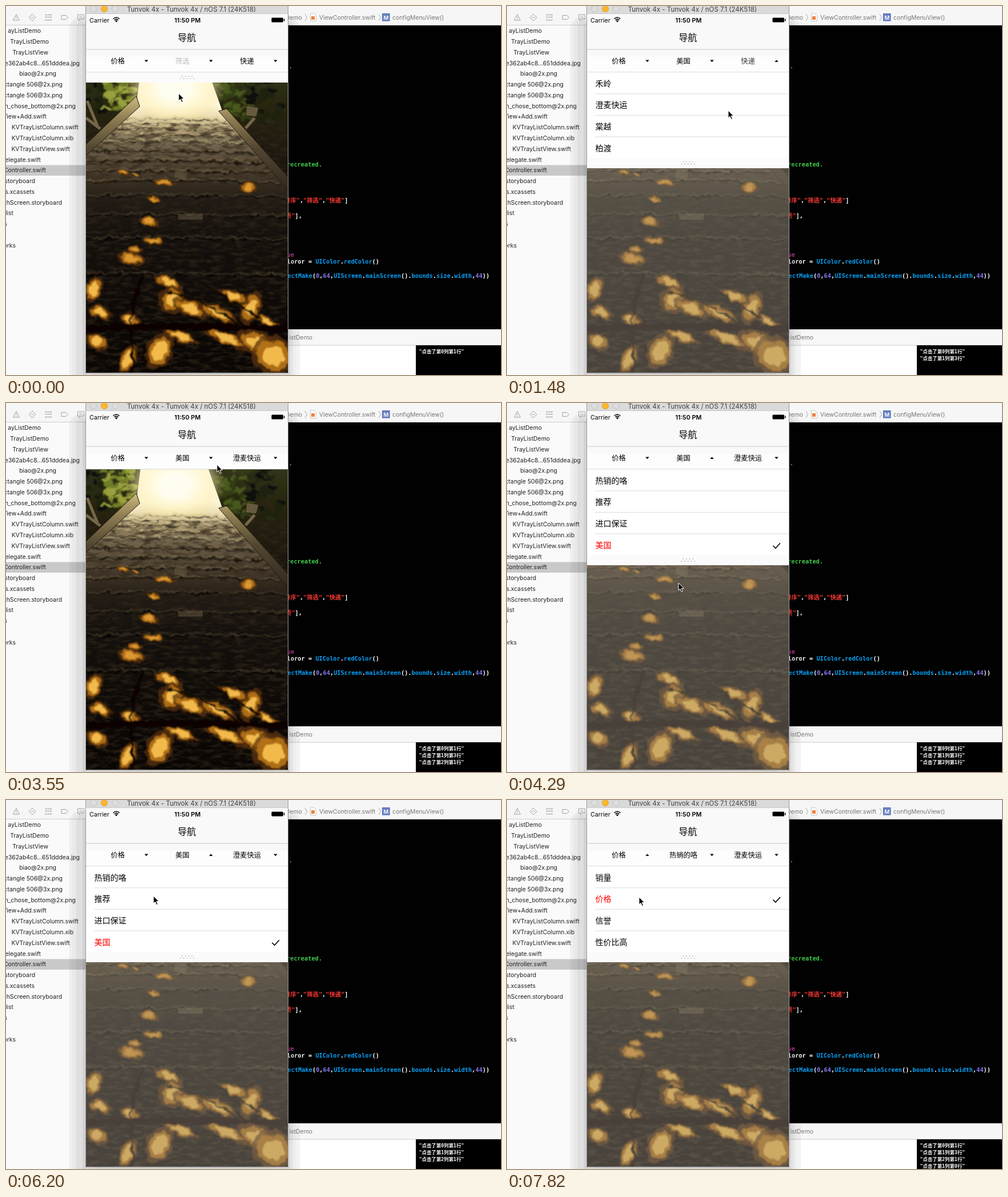
Animation of 866x646 px, one loop 8 s. Source, as an HTML page:

```html
<!DOCTYPE html>
<html lang="zh">
<head>
<meta charset="utf-8">
<style>
html, body { margin: 0; width: 100%; height: 100%; overflow: hidden; background: #fff; }
svg { display: block; width: 866px; height: 646px; }
text { white-space: pre; }
.ui { font-family: Inter, "Noto Sans CJK SC", "Noto Sans CJK", sans-serif; }
.cjk { font-family: "Noto Sans CJK SC", "Noto Sans CJK", sans-serif; }
.code { font: bold 10.3px "DejaVu Sans Mono", "Noto Sans CJK SC", "Noto Sans CJK", monospace; fill: #fff; }
.code .r { fill: #fb3a35; } .code .b { fill: #0aa0f5; } .code .n { fill: #8378f2; }
.code .g { fill: #41cf4b; } .code .m { fill: #b9359a; }
.log { font-size: 8.4px; }
</style>
</head>
<body>
<svg id="stage" viewBox="0 0 866 646" xmlns="http://www.w3.org/2000/svg"></svg>
<script>
const LOOP = 8000, TICK = 147.5, OPEN_H = 150, TOP = 116;
const stage = document.getElementById('stage');

const rect = (x, y, w, h, fill, more = '') =>
  `<rect x="${x}" y="${y}" width="${w}" height="${h}" fill="${fill}" ${more}/>`;
const path = (d, stroke, width = 1, fill = 'none', more = '') =>
  `<path d="${d}" stroke="${stroke}" stroke-width="${width}" fill="${fill}" ${more}/>`;
const text = (x, y, s, size, more = '', cls = 'ui') =>
  `<text x="${x}" y="${y}" class="${cls}" ${size ? `font-size="${size}"` : ''} ${more}>${s}</text>`;
const gradient = (id, stops) =>
  `<linearGradient id="${id}" gradientUnits="userSpaceOnUse" x1="0" y1="116" x2="0" y2="642">` +
  stops.map(([y, c]) => `<stop offset="${(y - 116) / 526}" stop-color="${c}"/>`).join('') +
  '</linearGradient>';
const END = 'text-anchor="end"', MID = 'text-anchor="middle"';

function random(seed) {
  return () => (seed = (seed * 16807) % 2147483647) / 2147483647;
}

function defs() {
  return `<defs>
    ${gradient('ground', [[116, '#33351a'], [170, '#28260f'], [230, '#211c10'], [320, '#15110c'], [420, '#0c0907'], [642, '#080504']])}
    ${gradient('stone', [[116, '#fffef4'], [172, '#fff9df'], [196, '#e9d9ac'], [216, '#a8966f'], [238, '#786a51'], [270, '#584b39'], [305, '#3d3326'], [340, '#211b15'], [400, '#14100d'], [467, '#110d0a'], [560, '#0c0806'], [642, '#0a0604']])}
    ${gradient('wall', [[150, '#d9c688'], [200, '#8b7a50'], [250, '#514530'], [320, '#332b20']])}
    <radialGradient id="sun"><stop offset=".3" stop-color="#fffdf0"/><stop offset=".65" stop-color="#fff4c4" stop-opacity=".7"/><stop offset="1" stop-color="#f5dd8d" stop-opacity="0"/></radialGradient>
    <filter id="ragged" x="-5%" y="-5%" width="110%" height="110%">
      <feTurbulence type="fractalNoise" baseFrequency=".07" numOctaves="3" seed="4"/>
      <feDisplacementMap in="SourceGraphic" scale="13" xChannelSelector="R" yChannelSelector="G" result="d"/>
      <feGaussianBlur in="d" stdDeviation=".9"/>
    </filter>
    <filter id="grain" x="0" y="0" width="100%" height="100%">
      <feTurbulence type="fractalNoise" baseFrequency=".05 .16" numOctaves="4" seed="9"/>
      <feColorMatrix values="0 0 0 0 .03  0 0 0 0 .02  0 0 0 0 .01  3.2 0 0 0 -1.35"/>
    </filter>
    <clipPath id="photoClip"><rect x="140" y="116" width="353" height="526"/></clipPath>
    <clipPath id="stairClip"><path d="M140 205H493V642H140Z"/></clipPath>
    <clipPath id="listClip"><rect id="listBox" x="140" y="116" width="353" height="0"/></clipPath>
  </defs>`;
}

// x, y, rx, ry of the sun flecks
const flecks = `205 293 9 3,228 294 5 2,277 309 14 4,424 317 10 7,258 339 9 5,250 377 15 6,
258 411 14 5,226 425 11 6,220 443 17 9,153 495 11 17,166 537 15 8,216 548 13 8,284 484 18 8,
290 514 17 17,322 529 24 9,370 537 27 9,428 528 12 22,398 508 20 7,457 552 16 6,268 604 17 24,
213 618 10 20,160 588 15 10,305 578 24 7,385 582 32 7,440 590 28 15,468 612 28 25`
  .split(',').map(s => s.trim().split(/\s+/).map(Number));

function photo() {
  const rnd = random(77);
  let leaves = '', spots = '', steps = '';
  for (let i = 0; i < 190; i++) {
    const right = i % 2, a = rnd(), y = 117 + rnd() * (right ? 85 : 68);
    const x = right ? 362 + (y - 117) * .35 + a * 100 : 141 + a * 84;
    const lit = right ? x < 425 : x > 170 && y < 180;
    const fill = lit ? ['#6f7d27', '#48591c', '#99a03d', '#303d13'][i % 4 | 0] : ['#1b2010', '#282b14', '#0e0e08'][i % 3];
    leaves += `<ellipse cx="${x}" cy="${y}" rx="${3 + rnd() * 6}" ry="${2 + rnd() * 4}" fill="${fill}"/>`;
  }
  for (const [x, y, rx, ry] of flecks) {
    const turn = `transform="rotate(${y > 460 ? 24 : 8} ${x} ${y})"`;
    const oval = (k, fill, o) => `<ellipse cx="${x}" cy="${y}" rx="${rx * k}" ry="${ry * k}" fill="${fill}" opacity="${o}" ${turn}/>`;
    spots += oval(1.4, '#5a320b', .75) + oval(1.05, '#b97517', .9) + oval(.68, y > 460 ? '#f2ba4c' : '#dc9830', 1);
  }
  [196, 204, 213, 223, 236, 252, 269, 287, 304, 330, 364, 405, 468].forEach((y, i) => {
    const left = Math.max(140, 228 - (y - 172) * 1.12), right = Math.min(493, 378 + (y - 185) * .86);
    const d = `M${left} ${y}Q${(left + right) / 2} ${y - 3} ${right} ${y + 3}`;
    steps += path(d, i < 5 ? '#d5c38e' : i < 9 ? '#82714f' : '#4d4434', i < 9 ? 1.4 : 1.8, 'none', 'opacity=".8"') +
      path(d, '#080604', i < 5 ? 1.5 : 3, 'none', 'transform="translate(0 3)" opacity=".7"');
  });
  return `<g clip-path="url(#photoClip)">
    ${rect(140, 116, 353, 526, 'url(#ground)')}
    <g filter="url(#ragged)">${leaves}</g>
    ${path('M236 110H352L380 188L493 322V650H140V258L229 165Z', 'none', 0, 'url(#stone)')}
    <ellipse cx="296" cy="143" rx="88" ry="68" fill="url(#sun)"/>
    <g filter="url(#ragged)">${steps}</g>
    ${rect(140, 205, 353, 437, '#000', 'filter="url(#grain)" opacity=".65" clip-path="url(#stairClip)"')}
    ${path('M228 158L234 176L140 262V242Z', '#1b160d', 1, 'url(#wall)')}
    ${path('M372 184L386 180L493 299V322Z', '#1b160d', 1, 'url(#wall)')}
    ${path('M421 174L442 178L438 194L419 192Z', '#25200f', 1, '#655a3d')}
    ${path('M435 196L419 214M142 166L160 210M140 196L165 215', '#75664a', 5)}
    ${path('M296 286H316V301H294ZM300 364H344V374H302Z', 'none', 0, '#675a42', 'opacity=".55"')}
    <g filter="url(#ragged)">${spots}
      ${path('M130 566Q300 556 500 565', '#080503', 11)}
      ${path('M240 470Q222 510 219 562L222 645', '#080503', 5)}
      ${path('M280 500Q360 520 410 560M345 485L450 550', '#130c05', 4)}
    </g></g>`;
}

function sidebar() {
  const files = [['ayListDemo', 61], ['TrayListDemo', 75], ['TrayListView', 74], ['7e362ab4c8...651dddea.jpg', 129],
    ['biao@2x.png', 88], ['ctangle 506@2x.png', 99], ['ctangle 506@3x.png', 99], ['n_chose_bottom@2x.png', 122],
    ['View+Add.swift', 71], ['KVTrayListColumn.swift', 127], ['KVTrayListColumn.xib', 118], ['KVTrayListView.swift', 112],
    ['elegate.swift', 61], ['Controller.swift', 70], ['storyboard', 51], ['s.xcassets', 50],
    ['hScreen.storyboard', 98], ['list', 13], ['s', 2], ['', 0], ['orks', 17]];
  return rect(0, 34, 140, 612, '#fafafa') + rect(0, 278.5, 140, 18.5, '#c9c9c9') +
    files.map(([s, x], i) => text(x, 47.3 + i * 18.77, s, 10.4, END + ' fill="#222"')).join('');
}

function toolbar() {
  const grey = '#a2a2a2';
  const chevron = x => path(`M${x} 14L${x + 3.5} 20L${x} 26`, '#aaa');
  return rect(0, 0, 866, 34, '#f6f6f6') + rect(0, 33, 866, 1, '#cfcfcf') +
    path('M18 14.5L23.5 25H12.5ZM18 18V21.5M18 22.8V24', grey) +
    path('M46 14L52 20L46 26L40 20ZM43.5 20H48.5', grey) +
    path('M68.500 15.500H80M68.500 19.500H80M68.500 24.500H80', grey, 1.5) +
    path('M72 14V25M76 14V25', '#f6f6f6', 1) +
    path('M97 16.500H105L108.500 20L105 23.500H97Z', grey) +
    path('M125.500 15H136.500V23H131L128 26V23H125.500Z', grey) + path('M128 18H134M128 20.500H134', grey, .8) +
    text(518, 24, 'Demo', 10.4, END + ' fill="#777"') + chevron(523) +
    path('M532.500 13H539L542.500 16.500V26.500H532.500Z', '#c6c6c6', 1, '#fff') + rect(534, 18, 6, 6, '#f0813c') +
    text(548, 24, 'ViewController.swift', 10.4, 'fill="#777"') + chevron(652) +
    rect(658.5, 13.5, 12.5, 12.5, '#6b83c6', 'stroke="#4d66ad"') +
    text(664.8, 23.5, 'M', 9.5, MID + ' fill="#fff" font-weight="600"') +
    text(676, 24, 'configMenuView()', 10.4, 'fill="#777"');
}

function editor() {
  const line = (x, y, s) => text(x, y, s, 0, END, 'code');
  const span = (c, s) => `<tspan class="${c}">${s}</tspan>`;
  return rect(493, 34, 373, 532, '#010101') +
    line(501, 108.5, span('g', 'd.')) + line(553, 281, span('g', 'recreated.')) +
    line(598.5, 344, span('r', '排序"') + ',' + span('r', '"筛选"') + ',' + span('r', '"快递"') + ']') +
    line(518, 371, span('r', '费"') + '],') + line(504, 439, span('m', 'ue')) +
    line(653, 451, 'loror = ' + span('b', 'UIColor') + '.' + span('b', 'redColor') + '()') +
    line(846, 475.5, span('b', 'ectMake') + '(' + span('n', '0') + ',' + span('n', '64') + ',' +
      span('b', 'UIScreen') + '.' + span('b', 'mainScreen') + '().' + span('b', 'bounds') + '.' +
      span('b', 'size') + '.' + span('b', 'width') + ',' + span('n', '44') + '))') +
    rect(140, 566, 726, 28, '#f7f7f7') + rect(140, 594, 577, 52, '#fff') +
    rect(140, 593.5, 726, 1, '#cbcbcb') + rect(717, 594, 149, 52, '#000') +
    text(536, 584, 'istDemo', 10.4, END + ' fill="#777"') + '<g id="log"></g>';
}

function phone() {
  let shade = '';
  for (const [l, r, o] of [[110.5, 514, .045], [116, 507, .025], [123, 502, .045], [134, 497, .06]])
    shade += rect(l, 34 - (140 - l) / 2, r - l, 650, '#000', `opacity="${o}" rx="${(140 - l) * .7}"`);
  const light = (x, fill, edge) => `<circle cx="${x}" cy="5" r="5.5" fill="${fill}" stroke="${edge}"/>`;
  return shade + rect(139, 0, 355, 643, '#9a9a9a') + rect(153, 642, 318, 2, '#b5b5b5') +
    rect(140, 0, 353, 14, '#dadada') + rect(140, 13.5, 353, 1, '#b9b9b9') +
    light(153, '#dedede', '#c4c4c4') + light(172, '#fdb72d', '#dda02b') + light(191, '#dedede', '#c4c4c4') +
    text(324.5, 9.5, 'Tunvok 4x - Tunvok 4x / nOS 7.1 (24K518)', 11.5, MID + ' fill="#444"') +
    rect(140, 14, 353, 62, '#f9f9f9') +
    text(146, 28.5, 'Carrier', 10.6) +
    path('M187.500 22.500Q193 17.500 198.500 22.500M189.500 24.700Q193 21.500 196.500 24.700', '#000', 1.5) +
    path('M190.800 26Q193 24.200 195.200 26L193 28.500Z', 'none', 0, '#000') +
    text(317.5, 28.5, '11:50 PM', 10.8, MID + ' font-weight="600"') +
    rect(464.5, 20.5, 20.5, 8, '#000', 'rx="1.5"') + rect(486, 22.5, 1.5, 4, '#000') +
    text(316.5, 60.5, '导航', 16, MID + ' font-weight="500"', 'cjk');
}

const lists = [
  { title: '排序', rows: ['销量', '价格', '信誉', '性价比高'] },
  { title: '筛选', rows: ['热销的咯', '推荐', '进口保证', '美国'] },
  { title: '快递', rows: ['禾岭', '澄麦快运', '棠越', '柏渡'] }
];
const labelX = [195.5, 308.5, 421.5], arrowX = [245.5, 358.5, 471.5];

function menu() {
  let dots = '';
  for (let i = 0; i < 9; i++) dots += rect(304 + i * 2.9, i % 2 ? 7 : 11, 2.3, 2, '#d2d2d2');
  return `${rect(140, 116, 353, 526, '#9c9488', 'id="dim"')}
    <g id="handle">${rect(140, 0, 353, 19, '#fbfbfb')}${rect(140, 0, 353, 1, '#d9d9d9')}${dots}</g>
    <g clip-path="url(#listClip)">${rect(140, 116, 353, 150, '#fff')}<g id="rows"></g></g>
    ${rect(140, 76, 353, 13, '#f9f9f9')}${rect(140, 89, 353, 27, '#fdfdfd')}
    ${rect(140, 75.5, 353, 1, '#c9c9c9')}${rect(140, 115.2, 353, 1, '#dcdcdc')}
    ${labelX.map((x, i) => text(x, 100.5, '', 12.3, `${MID} id="label${i}" font-weight="500"`, 'cjk') +
      path('', 'none', 0, '#000', `id="arrow${i}"`)).join('')}`;
}

const opens = [[0, 5, 1], [8.8, 14, 2], [17, 22, 2], [27, 32, 1], [36, 43, 1], [48, 60, 0]];
const picks = [[-9, 0, 1], [5, 1, 3], [14, 2, 1], [43, 1, 0]];
const moves = [[0, 302, 153], [2, 296, 195], [4, 300, 243], [5, 302, 243], [8, 425, 100], [9, 418, 115],
  [10, 387, 183], [11, 380, 190], [12, 380, 190], [14, 340, 172], [16, 420, 100], [17, 385, 135],
  [18, 315, 229], [20, 292, 318], [21, 292, 318], [22, 300, 310], [24, 369, 108], [25, 360, 99],
  [26, 360, 99], [29, 300, 315], [30, 300, 315], [32, 296, 320], [34, 315, 75], [35, 314, 84],
  [36, 312, 98], [39, 285, 205], [42, 258, 168], [43, 245, 136], [47, 215, 100], [48, 215, 98],
  [50, 238, 190], [53, 231, 170], [60, 231, 170]];

stage.innerHTML = defs() + toolbar() + sidebar() + editor() + phone() + photo() + menu() +
  `<g id="cursor">${path('M0 0V13L3 10.300L5.300 15.500L7.500 14.500L5.200 9.500H9.300Z', '#fff', 1, '#000')}</g>`;
const $ = id => document.getElementById(id);
const set = (id, attrs) => { for (const k in attrs) $(id).setAttribute(k, attrs[k]); };

function pointer(t) {
  const i = moves.findIndex(m => m[0] > t), [a, ax, ay] = moves[i - 1], [b, bx, by] = moves[i];
  const k = (t - a) / (b - a);
  return [ax + (bx - ax) * k, ay + (by - ay) * k];
}

const ease = p => { const q = 1 - Math.min(1, Math.max(0, p / 1.2)); return 1 - q * q; };

function drawRows(col, chosen) {
  $('rows').innerHTML = lists[col].rows.map((s, i) => {
    const y = 135.5 + i * 37.6, on = i === chosen;
    return text(154.5, y + 5.2, s, 14, `fill="${on ? '#f00' : '#000'}"`, 'cjk') +
      (i < 3 ? rect(154, y + 17.8, 339, 1, '#dcdcdc') : '') +
      (on ? path(`M465.500 ${y + 1.5}L469.800 ${y + 6}L478 ${y - 3}`, '#000', 1.6) : '');
  }).join('');
}

function draw(t) {
  const done = picks.filter(p => p[0] <= t), chosen = [-1, -1, -1];
  done.forEach(([, col, row]) => { chosen[col] = row; });
  const now = opens.find(([a, b]) => t >= a && t < b + 1.2);
  let shown = 0, dim = 0, fade = 1, active = -1;
  if (now) {
    const [a, b, col] = now, closing = t >= b;
    shown = closing ? 1 - ease(t - b) : ease(t - a);
    dim = closing ? shown : Math.min(1, (t - a) / .8);
    fade = closing ? 1 : Math.min(1, .25 + .45 * (t - a));
    if (!closing && t > a) active = col;
    drawRows(col, chosen[col]);
  }
  const h = shown * OPEN_H;
  set('listBox', { height: h });
  set('dim', { opacity: dim * .43 });
  set('handle', { transform: `translate(0 ${TOP - 1 + h})`, display: now ? 'inline' : 'none' });
  lists.forEach((list, i) => {
    $('label' + i).textContent = chosen[i] < 0 ? list.title : list.rows[chosen[i]];
    set('label' + i, { opacity: now && now[2] === i ? fade : 1 });
    const x = arrowX[i], up = active === i;
    set('arrow' + i, { d: up ? `M${x - 3.2} 98H${x + 3.2}L${x} 94.300Z` : `M${x - 3.2} 94.500H${x + 3.2}L${x} 98.200Z` });
  });
  $('log').innerHTML = done.map(([, col, row], i) =>
    text(722.5, 607.5 + i * 12.3, `"点击了第${col}列第${row}行"`, 0, 'style="font-size:8.4px"', 'code')).join('');
  set('cursor', { transform: `translate(${pointer(t)})` });
}

let last = -1;
const start = performance.now();
function frame() {
  const tick = Math.floor(((performance.now() - start) % LOOP) / TICK);
  if (tick !== last) draw(Math.min(53, last = tick));
  requestAnimationFrame(frame);
}
frame();
</script>
</body>
</html>
```
